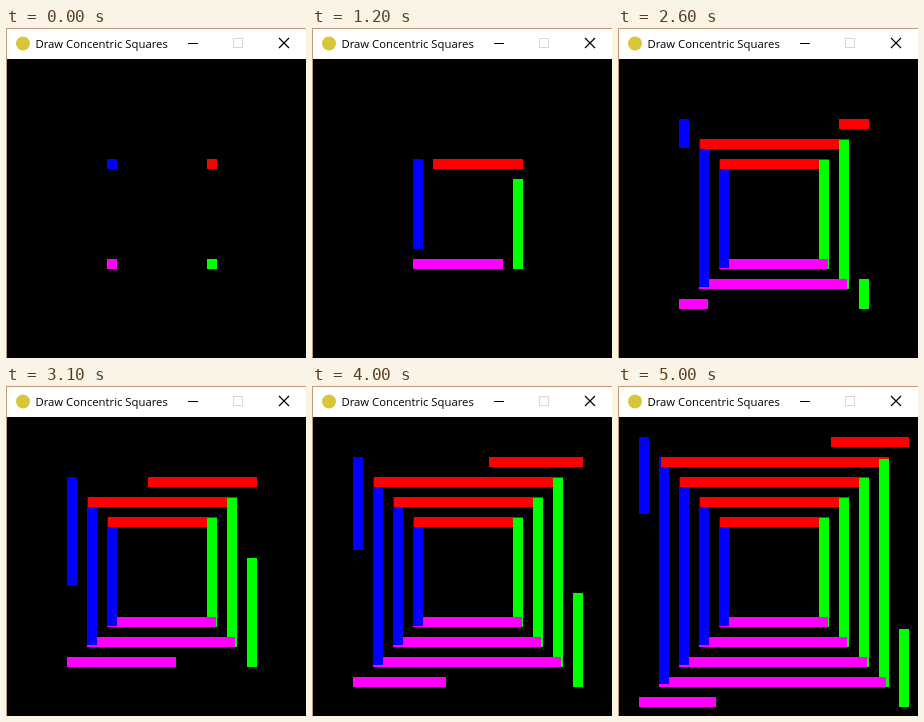
Write an HTML page with a canvas that moves like this. It is 300 by 330 pixels and loops after 5.1 s.

```html
<!DOCTYPE html>
<html lang="en">
<head>
<meta charset="utf-8">
<title>Draw Concentric Squares</title>
<style>
  html, body { margin: 0; width: 100%; height: 100%; overflow: hidden; background: #000; }
  svg, canvas { position: absolute; display: block; }
  svg { left: 0; top: 0; }
  canvas { left: 1px; top: 31px; }
  text { font: 11.3px "Open Sans", "Noto Sans", sans-serif; }
</style>
</head>
<body>
<svg width="300" height="330">
  <rect width="300" height="31" fill="#fff"/>
  <path d="M0 .5H300M.5 0V330" stroke="#c09a74"/>
  <circle cx="17" cy="15.5" r="7" fill="#d8c53c"/>
  <text x="29.4" y="20">Draw Concentric Squares</text>
  <path d="M182 15.5H192" stroke="#000"/>
  <path d="M273 10L283 20M283 10L273 20" stroke="#000" stroke-width="1.2"/>
  <rect x="227.5" y="10.5" width="9" height="9" fill="none" stroke="#e2d2d2"/>
</svg>
<canvas id="stage" width="299" height="299"></canvas>
<script>
const ctx = document.getElementById("stage").getContext("2d");
const LOOP = 5100, TICK = 100, SIZE = 10, STEPS = 100;

// Pace of drawing: [time in ms, steps taken so far]
const pace = [[0, 0], [300, 0], [1200, 80], [1900, 146], [2600, 211],
              [3100, 255], [4000, 338], [5000, 426]];

function stepsAt(time) {
  const i = pace.findIndex(([t]) => t >= time);
  if (i <= 0) return 0;
  const [t0, s0] = pace[i - 1], [t1, s1] = pace[i];
  return Math.round(s0 + (s1 - s0) * (time - t0) / (t1 - t0));
}

function block(color, x, y, w = SIZE, h = SIZE) {
  ctx.fillStyle = color;
  ctx.fillRect(x, y, w, h);
}

// Four heads leave the corners and trail their colour along the sides.
function drawSquare(index, step) {
  const near = 100 - 20 * index, far = 200 + 20 * index;
  const travel = (far - near) * step / STEPS;
  const ahead = Math.floor(near + travel), back = Math.floor(far - travel);

  block("#00f", near, near);
  block("#f00", far, near);
  block("#0f0", far, far);
  block("#f0f", near, far);

  block("#00f", near, near + SIZE, SIZE, ahead - near);
  block("#f00", back, near, far - back, SIZE);
  block("#0f0", far, back, SIZE, far - back);
  block("#f0f", near + SIZE, far, ahead - near, SIZE);
}

function render(now) {
  const time = Math.floor(now % LOOP / TICK) * TICK;
  const total = stepsAt(time), current = Math.floor(total / STEPS);
  block("#000", 0, 0, 299, 299);
  for (let i = 0; i <= current; i++) {
    drawSquare(i, i < current ? STEPS - 1 : total % STEPS);
  }
}

let start;
function frame(now) {
  start ??= now;
  render(now - start);
  requestAnimationFrame(frame);
}
render(0);
requestAnimationFrame(frame);
</script>
</body>
</html>
```
